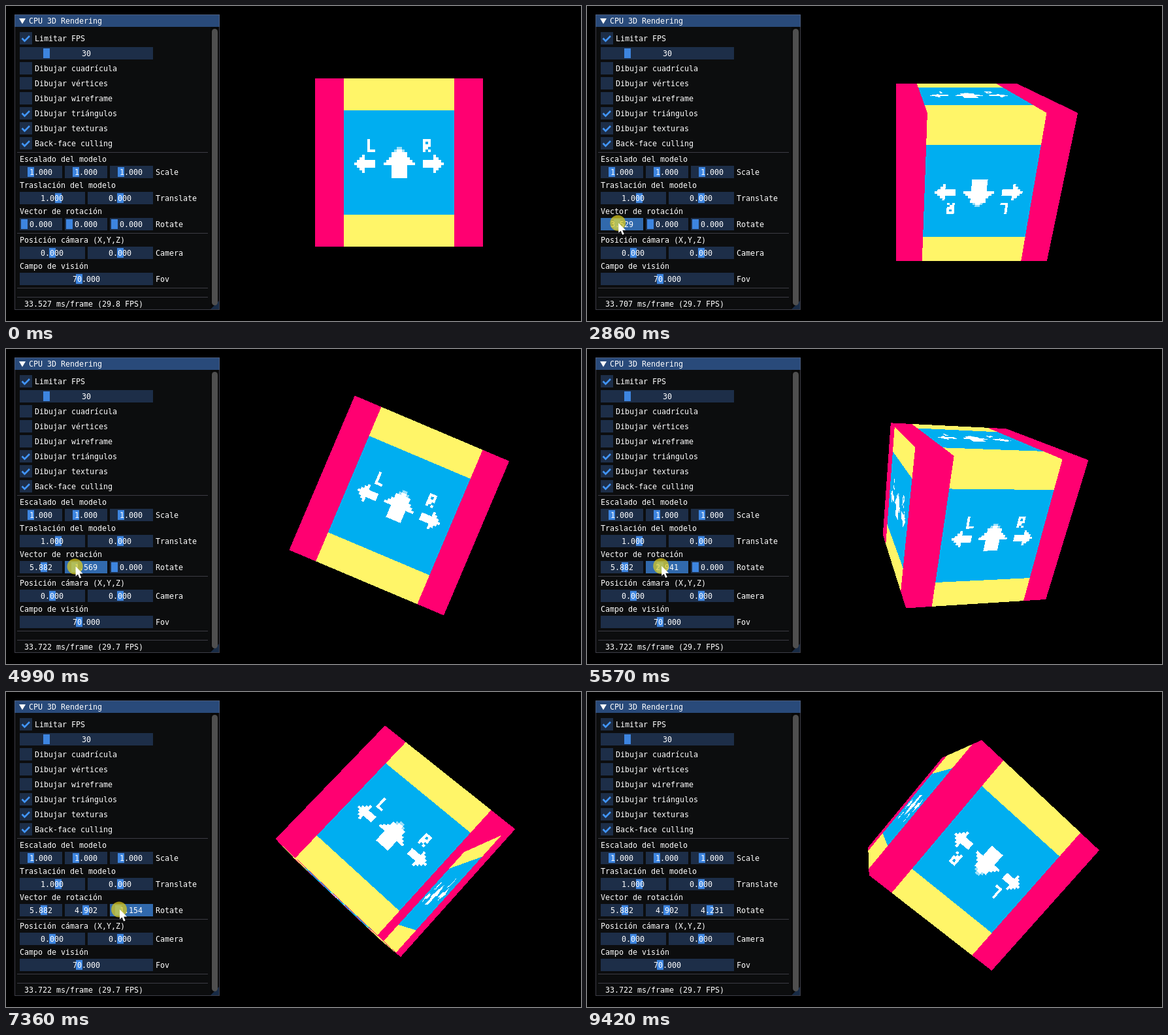
Animation of 880 by 483 pixels, one loop 9510 ms. Source, as an HTML page with a canvas:

```html
<!DOCTYPE html>
<html lang="es">
<head>
<meta charset="utf-8">
<title>CPU 3D Rendering</title>
<style>
html, body { margin: 0; height: 100%; overflow: hidden; background: #000; }
canvas { display: block; }
</style>
</head>
<body>
<canvas id="stage" width="880" height="483"></canvas>
<script>
const ctx = document.getElementById('stage').getContext('2d');
const LOOP = 9510, STEP = 81.68, LAST = 115;

// Each rotation slider is dragged once, one pixel at a time, at constant speed.
const DRAGS = [
  { x: 21, w: 65, from: 18, to: 46, travel: 30 },
  { x: 90, w: 65, from: 54, to: 77, travel: 25 },
  { x: 159, w: 66, from: 85, to: 103, travel: 22 }
];
const LEAVE = 108;

const mix = (a, b, f) => a + (b - a) * f;
const ramp = (n, from, to) => Math.max(0, Math.min(1, (n - from) / (to - from)));

// The pointer enters from below, visits each slider in turn and leaves.
const stops = [
  { n: 2, x: 112, y: 500 },
  ...DRAGS.flatMap(d => [
    { n: d.from - 3, x: d.x + 8, y: 334 },
    { n: d.from, x: d.x + 8, y: 334 },
    { n: d.to, x: d.x + 8 + d.travel, y: 332 }
  ]),
  { n: LEAVE, x: 219, y: 350 }
];

// ---- Cube texture, 64 x 64 texels ----
const rgb = c => (0xff000000 | (c & 255) << 16 | (c & 0xff00) | c >> 16) >>> 0;
const PINK = rgb(0xff0071), YELLOW = rgb(0xfff568), BLUE = rgb(0x00aef0);
const WHITE = rgb(0xffffff), PALE = rgb(0x9adff9), BLACK = rgb(0);
const texture = new Uint32Array(64 * 64);

function fill(x, y, w, h, color) {
  for (let v = y; v < y + h; v++) texture.fill(color, v * 64 + x, v * 64 + x + w);
}
function letter(x, y, rows) {
  rows.forEach((row, j) => [...row].forEach((c, i) => c === '#' && fill(x + i, y + j, 1, 1, WHITE)));
}

fill(0, 0, 64, 64, PINK);
fill(11, 0, 42, 64, YELLOW);
fill(11, 12, 42, 40, BLUE);
letter(20, 23, ['#', '#', '#', '#', '###']);
letter(41, 23, ['###', '#.#', '###', '##.', '#.#']);
for (let i = 0; i < 4; i++) {
  fill(15 + i, 32 - i, 1, 1 + 2 * i, WHITE);
  fill(48 - i, 32 - i, 1, 1 + 2 * i, WHITE);
}
fill(19, 31, 4, 3, WHITE);
fill(41, 31, 4, 3, WHITE);
for (let j = 0; j < 7; j++) {
  const half = Math.round((j + 1) * 6 / 7);
  fill(32 - half, 26 + j, 2 * half, 1, j < 2 ? PALE : WHITE);
}
fill(31, 27, 2, 1, WHITE);
fill(29, 33, 6, 5, WHITE);

// ---- Cube, ray cast per pixel ----
const VIEW = { x: 400, y: 40, w: 400, h: 400 };
const FOCAL = 514, CENTER_X = 472.6, CENTER_Y = 239.5;
const image = ctx.createImageData(VIEW.w, VIEW.h);
const pixels = new Uint32Array(image.data.buffer);

function turn(v, i, j, angle) {
  const c = Math.cos(angle), s = Math.sin(angle), a = v[i], b = v[j];
  v[i] = a * c + b * s;
  v[j] = b * c - a * s;
}
function toModel(v, [rx, ry, rz]) {
  turn(v, 0, 1, -rz);
  turn(v, 0, 2, -ry);
  turn(v, 1, 2, -rx);
  return v;
}

function texel(axis, side, p) {
  const u = axis === 0 ? 1 + side * p[2] : 1 - side * p[0];
  const v = axis === 1 ? 1 + p[2] : 1 - p[1];
  const clamp = c => Math.max(0, Math.min(63, Math.floor(c * 32)));
  return texture[clamp(v) * 64 + clamp(u)];
}

function drawCube(angles) {
  const origin = toModel([-1, 0, -5], angles);
  const [ex, ey, ez] = [[1, 0, 0], [0, 1, 0], [0, 0, 1]].map(v => toModel(v, angles));
  // Culling sees the cube twice as far away as it is drawn, and the farthest
  // face is painted last, so some grazing faces show on top.
  const cull = toModel([1, 0, 10], angles);
  const faces = [0, 1, 2]
    .flatMap(axis => [-1, 1].map(side => ({ axis, side, depth: side * ez[axis] })))
    .filter(f => f.side * cull[f.axis] + 1 < 0)
    .sort((a, b) => b.depth - a.depth);
  const d = [0, 0, 0], p = [0, 0, 0];

  function colorAlongRay() {
    for (const { axis, side } of faces) {
      const t = (side - origin[axis]) / d[axis];
      let inside = t > 0;
      for (let k = 0; k < 3; k++) {
        p[k] = origin[k] + t * d[k];
        if (k !== axis && Math.abs(p[k]) > 1) inside = false;
      }
      if (inside) return texel(axis, side, p);
    }
    return BLACK;
  }

  for (let j = 0, n = 0; j < VIEW.h; j++) {
    const dy = (CENTER_Y - VIEW.y - j) / FOCAL;
    for (let i = 0; i < VIEW.w; i++) {
      const dx = (VIEW.x + i - CENTER_X) / FOCAL;
      for (let k = 0; k < 3; k++) d[k] = ex[k] * dx + ey[k] * dy + ez[k];
      pixels[n++] = colorAlongRay();
    }
  }
  ctx.putImageData(image, VIEW.x, VIEW.y);
}

// ---- Panel ----
const FRAME = '#1d2e48', ACTIVE = '#3169ac', GRAB = '#3d85e0', ACCENT = '#4296fa';

function box(x, y, w, h, color) {
  ctx.fillStyle = color;
  ctx.fillRect(x, y, w, h);
}
function text(str, x, middle) {
  ctx.fillStyle = '#fff';
  ctx.fillText(str, x, middle + 4);
}
function polygon(points, color) {
  ctx.fillStyle = color;
  ctx.beginPath();
  points.forEach(([x, y]) => ctx.lineTo(x, y));
  ctx.closePath();
  ctx.fill();
}
function separator(y) {
  box(17, y, 292, 1, '#3c3c44');
}
function checkbox(y, label, checked) {
  box(21, y - 10, 19, 19, FRAME);
  if (checked) {
    ctx.strokeStyle = ACCENT;
    ctx.lineWidth = 2.6;
    ctx.beginPath();
    ctx.moveTo(24.5, y - 0.5);
    ctx.lineTo(28.5, y + 3.7);
    ctx.lineTo(36, y - 4);
    ctx.stroke();
  }
  text(label, 44, y);
}
function slider(x, w, y, grab, value, active) {
  box(x, y - 10, w, 19, active ? ACTIVE : FRAME);
  box(grab - 5, y - 8, 10, 15, active ? ACCENT : GRAB);
  text(value, Math.floor(x + w / 2 - value.length * 3.5), y);
}
function group(title, label, y, drawSliders) {
  text(title, 21, y - 20);
  drawSliders(y);
  text(label, 229, y);
}

function drawPanel(n, offsets, angles) {
  ctx.font = '11.63px "DejaVu Sans Mono", monospace';
  box(13, 13, 314, 453, '#0c0d0e');
  box(13, 13, 314, 19, '#294a7a');
  polygon([[20, 19], [30, 19], [25, 27.5]], '#fff');
  text('CPU 3D Rendering', 35, 23);

  box(313, 32, 13, 433, '#080808');
  polygon([[326, 452], [326, 465], [313, 465]], '#182b45');
  ctx.fillStyle = '#4f4f4f';
  ctx.beginPath();
  ctx.roundRect(315, 35, 9, 424, 4.5);
  ctx.fill();
  ctx.strokeStyle = 'rgba(110, 110, 128, 0.5)';
  ctx.lineWidth = 1;
  ctx.strokeRect(13.5, 13.5, 313, 452);

  checkbox(50, 'Limitar FPS', true);
  slider(21, 204, 73, 62, '30');
  ['Dibujar cuadrícula', 'Dibujar vértices', 'Dibujar wireframe',
    'Dibujar triángulos', 'Dibujar texturas', 'Back-face culling']
    .forEach((label, i) => checkbox(96 + 23 * i, label, i > 2));
  separator(224);

  group('Escalado del modelo', 'Scale', 255, y =>
    DRAGS.forEach(s => slider(s.x, s.w, y, s.x + 17, '1.000')));
  group('Traslación del modelo', 'Translate', 295, y => {
    slider(21, 100, y, 80, '1.000');
    slider(125, 100, y, 175, '0.000');
  });
  group('Vector de rotación', 'Rotate', 335, y =>
    DRAGS.forEach((s, i) =>
      slider(s.x, s.w, y, s.x + 7 + offsets[i], angles[i].toFixed(3), n >= s.from && n <= s.to + 1)));
  separator(348);
  group('Posición cámara (X,Y,Z)', 'Camera', 379, y => {
    slider(21, 100, y, 71, '0.000');
    slider(125, 100, y, 175, '0.000');
  });
  group('Campo de visión', 'Fov', 419, y => slider(21, 204, y, 112, '70.000'));
  separator(432);
  separator(446);

  const ms = 33.527 + 0.195 * ramp(n, 0, 38);
  text(`${ms.toFixed(3)} ms/frame (${(1000 / ms).toFixed(1)} FPS)`, 28, 457);
}

function drawCursor(n) {
  if (n < stops[0].n || n > LEAVE) return;
  const next = Math.max(1, stops.findIndex(s => s.n >= n));
  const a = stops[next - 1], b = stops[next];
  const f = ramp(n, a.n, b.n);
  const x = mix(a.x, b.x, f), y = mix(a.y, b.y, f);
  ctx.fillStyle = 'rgba(225, 207, 25, 0.7)';
  ctx.beginPath();
  ctx.arc(x, y, 12, 0, 2 * Math.PI);
  ctx.fill();
  polygon([[0, 0], [0, 15], [3.5, 12], [6, 18], [8.5, 17], [6, 11], [11, 11]]
    .map(([dx, dy]) => [x + 1 + dx, y + dy]), '#fff');
}

let shown = -1;
function draw() {
  const n = Math.min(LAST, Math.floor(performance.now() % LOOP / STEP));
  if (n !== shown) {
    shown = n;
    const offsets = DRAGS.map(s => Math.round(s.travel * ramp(n, s.from, s.to)));
    const angles = DRAGS.map((s, i) => offsets[i] * 10 / (s.w - 14));
    box(0, 0, 880, 483, '#000');
    drawCube(angles);
    drawPanel(n, offsets, angles);
    drawCursor(n);
  }
  requestAnimationFrame(draw);
}
draw();
</script>
</body>
</html>
```
